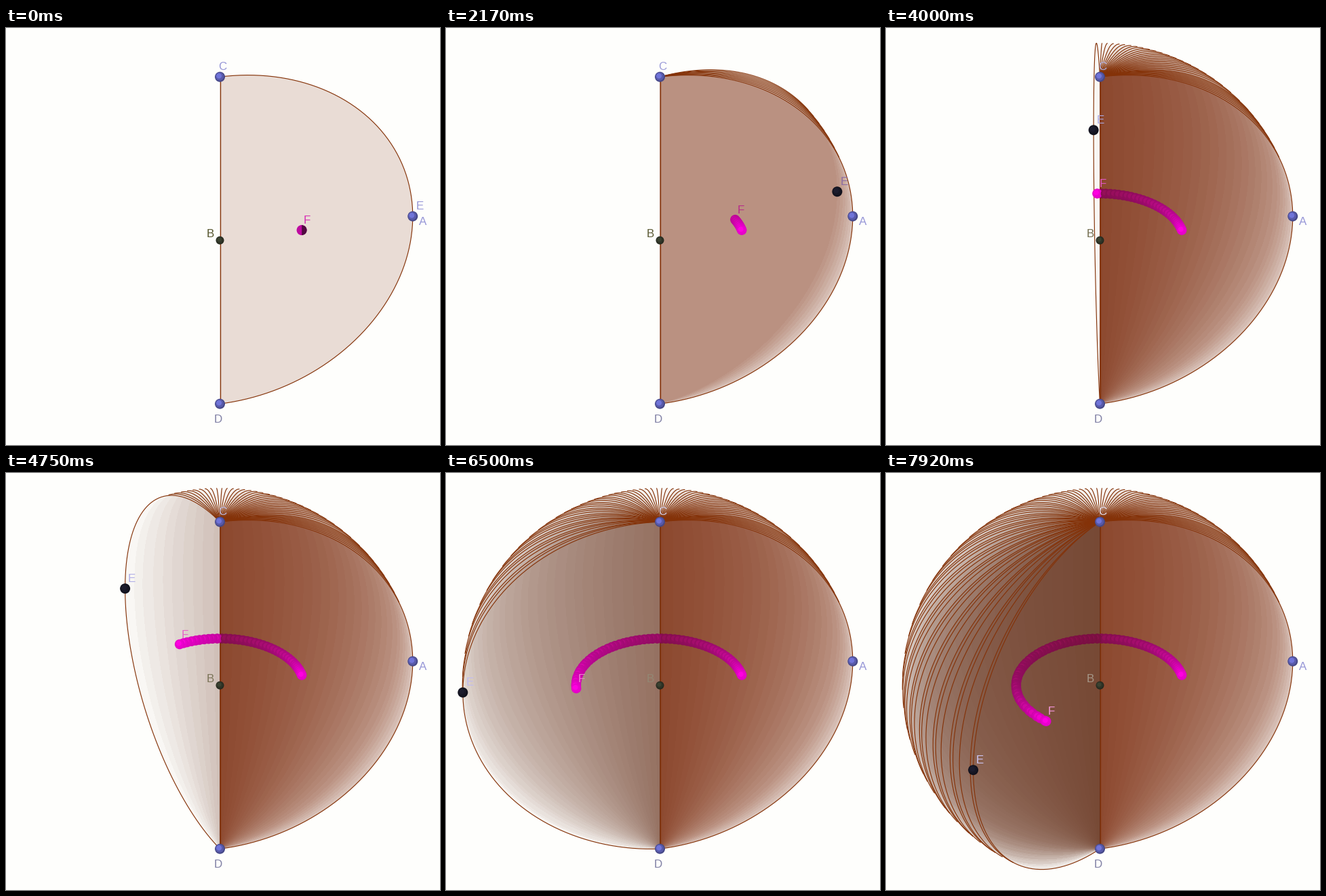
A matplotlib script that plays this animation: 640x616 px, repeating every 8 s.

```python
import numpy as np
import matplotlib.pyplot as plt
from matplotlib.animation import FuncAnimation
from matplotlib.collections import LineCollection
from matplotlib.patches import Wedge

W, H, DPI = 640, 616, 100
FRAMES, LOOP = 96, 8000
PX = 72 / DPI

# Sphere seen from above: radius, equator's half height, pole height
R, EQ, POLE = 291.3, 163.0, 241.5
CX, CY = 315.5, 313.7
CENTROID = 4 / (3 * np.pi)
START = 20          # first frame in which the half disc turns

PAPER = (254, 254, 252)
BACK_TINT, FRONT_TINT = (120, 40, 10), (100, 48, 26)
BROWN = np.array((132, 50, 8)) / 255
MAGENTA, SHADE = (242, 0, 212), (112, 18, 48)
BLUE, NAVY, OLIVE = (106, 109, 205), (26, 26, 42), (56, 62, 46)
LAVENDER = (150, 150, 215)


def mix(a, b, t):
    return np.array(a) * (1 - t) + np.array(b) * t


def turn_angles():
    """Nearly even turn; every third step runs ahead, more so later on."""
    k = np.arange(FRAMES)
    degrees = np.interp(k, [START - 1, 26, 57, 68, 78, 95],
                        [12.6, 26.2, 118.7, 154.1, 183.7, 230.1])
    stutter = 1.7 * (k / FRAMES) ** 3 * (k % 3 == 1)
    return np.radians(degrees + stutter)


def on_equator(a, scale=1.0):
    return np.stack([CX + scale * R * np.cos(a), CY - scale * EQ * np.sin(a)], axis=-1)


def arc(a, low=-np.pi / 2):
    s = np.linspace(low, np.pi / 2, 90)
    x = CX + R * np.cos(s) * np.cos(a)
    y = CY - POLE * np.sin(s) - EQ * np.cos(s) * np.sin(a)
    return np.column_stack([x, y])


def front_arc(a):
    """The part of the arc on the near side of the sphere."""
    return arc(a, np.arctan(np.sin(a) * POLE / EQ))


def half_disc(a):
    dx = (np.arange(W) + 0.5 - CX)[None, :]
    dy = (CY - np.arange(H) - 0.5)[:, None]
    c = dx / (R * np.cos(a))
    s = (dy - EQ * np.sin(a) * c) / POLE
    return (c >= 0) & (c * c + s * s <= 1)


def paint_layers():
    """Stack the translucent half discs; one picture per frame."""
    canvas = np.full((H, W, 3), PAPER, dtype=np.float32)

    def stain(mask, tint, opacity):
        canvas[mask] += (np.array(tint) - canvas[mask]) * opacity

    first = half_disc(theta[0])
    stain(first, BACK_TINT, 0.16)
    out = []
    for k in range(FRAMES):
        if k >= START:
            tint = BACK_TINT if theta[k] < np.pi / 2 else FRONT_TINT
            stain(half_disc(theta[k]), tint, alpha[k])
        elif k >= 6 and k % 2 == 0:
            stain(first, BACK_TINT, 0.02)
        out.append(canvas.round().astype(np.uint8))
    return out


theta = turn_angles()
# Discs seen on their lit side cover less
lit = (theta > np.pi / 2) & (theta < np.pi)
alpha = np.where(lit, 0.035, 0.055)
alpha[:START] = 0
clear = np.cumprod(1 - alpha)
layers = paint_layers()
base_arc = arc(theta[0])
front_arcs = [front_arc(a) for a in theta]

fig = plt.figure(figsize=(W / DPI, H / DPI), dpi=DPI)
ax = fig.add_axes([0, 0, 1, 1])
ax.axis("off")
image = ax.imshow(layers[0], extent=(0, W, H, 0),
                  interpolation="nearest", aspect="auto")
ax.set_xlim(0, W)
ax.set_ylim(H, 0)

lines = LineCollection([], colors=[BROWN], linewidths=1.15 * PX, zorder=2)
ax.add_collection(lines)
ax.plot([CX, CX], [CY - POLE, CY + POLE], color=BROWN, lw=1.3 * PX, zorder=3)
balls = ax.scatter([], [], linewidths=0, zorder=4)

halves = [Wedge(on_equator(theta[0], CENTROID), 7.5, turn, turn + 180,
                fc=color, lw=0, zorder=5)
          for turn, color in ((90, "#be0aa0"), (-90, "#500a40"))]
for half in halves:
    ax.add_patch(half)

# Label: place, ink at rest, ink over the finished solid
LABELS = {
    "A": ((614.5, 285), LAVENDER, LAVENDER),
    "B": ((301, 303), (85, 85, 45), (165, 150, 135)),
    "C": ((319, 55.5), LAVENDER, (225, 222, 240)),
    "D": ((313, 577), (128, 128, 165), (128, 128, 165)),
    "E": ((0, 0), LAVENDER, (205, 198, 245)),
    "F": ((0, 0), (215, 50, 180), (245, 150, 220)),
}
texts = {name: ax.text(*place, name, fontsize=17 * PX, family="Liberation Sans",
                       ha="center", va="center_baseline", zorder=6)
         for name, (place, _, _) in LABELS.items()}


def sphere(pos, r, color, rim=0.66):
    """Three stacked discs: rim, body and highlight."""
    x, y = pos
    rings = ((0, 1, rim), (0.08, 0.82, (1 + rim) / 2), (0.18, 0.52, 1.06))
    return [((x - r * d, y - r * d), r * size,
             np.clip(np.array(color) * tone / 255, 0, 1))
            for d, size, tone in rings]


def trail(k):
    """Centroid balls, far ones first, dimmed by the discs before them."""
    last = max(k, START - 1)
    parts = []
    for i in sorted(range(START - 1, last + 1), key=lambda i: -np.sin(theta[i])):
        behind = theta[i] < np.pi / 2
        seen = clear[i] if behind else clear[last] / clear[i]
        color = mix(SHADE, MAGENTA, seen)
        parts += sphere(on_equator(theta[i], CENTROID), 7.3, color, rim=0.94)
    return parts


def update(k):
    image.set_data(layers[k])
    behind = theta[k] < np.pi / 2
    segs = [base_arc]
    if k >= START:
        segs += front_arcs[START:k]
        segs.append(front_arcs[k] if behind else arc(theta[k]))
    lines.set_segments(segs)

    e = on_equator(theta[k])
    f = on_equator(theta[k], CENTROID)
    parts = trail(k)
    for pos in ((CX, CY - POLE), (CX, CY + POLE), on_equator(theta[0])):
        parts += sphere(pos, 7.5, BLUE)
    parts += sphere((CX, CY), 6, OLIVE)
    if k >= START:
        parts += sphere(e, 7.5, NAVY)
    spots, radii, colors = zip(*parts)
    balls.set_offsets(np.array(spots))
    balls.set_sizes((2 * np.array(radii) * PX) ** 2)
    balls.set_facecolor(np.array(colors))
    for half in halves:
        half.set_visible(k < 12)

    texts["E"].set_position((e[0] + 10, e[1] - 16))
    texts["F"].set_position((f[0] + 8, f[1] - 15.5))
    progress = np.clip((k - START) / (FRAMES - 1 - START), 0, 1)
    for name, (_, rest, end) in LABELS.items():
        ink = mix(rest, end, progress)
        if behind and name in "EF":
            ink = mix(SHADE, ink, clear[k])
        texts[name].set_color(ink / 255)
    return []


anim = FuncAnimation(fig, update, frames=FRAMES, interval=LOOP / FRAMES,
                     init_func=lambda: update(0), repeat=True, repeat_delay=0)
plt.show()
```
